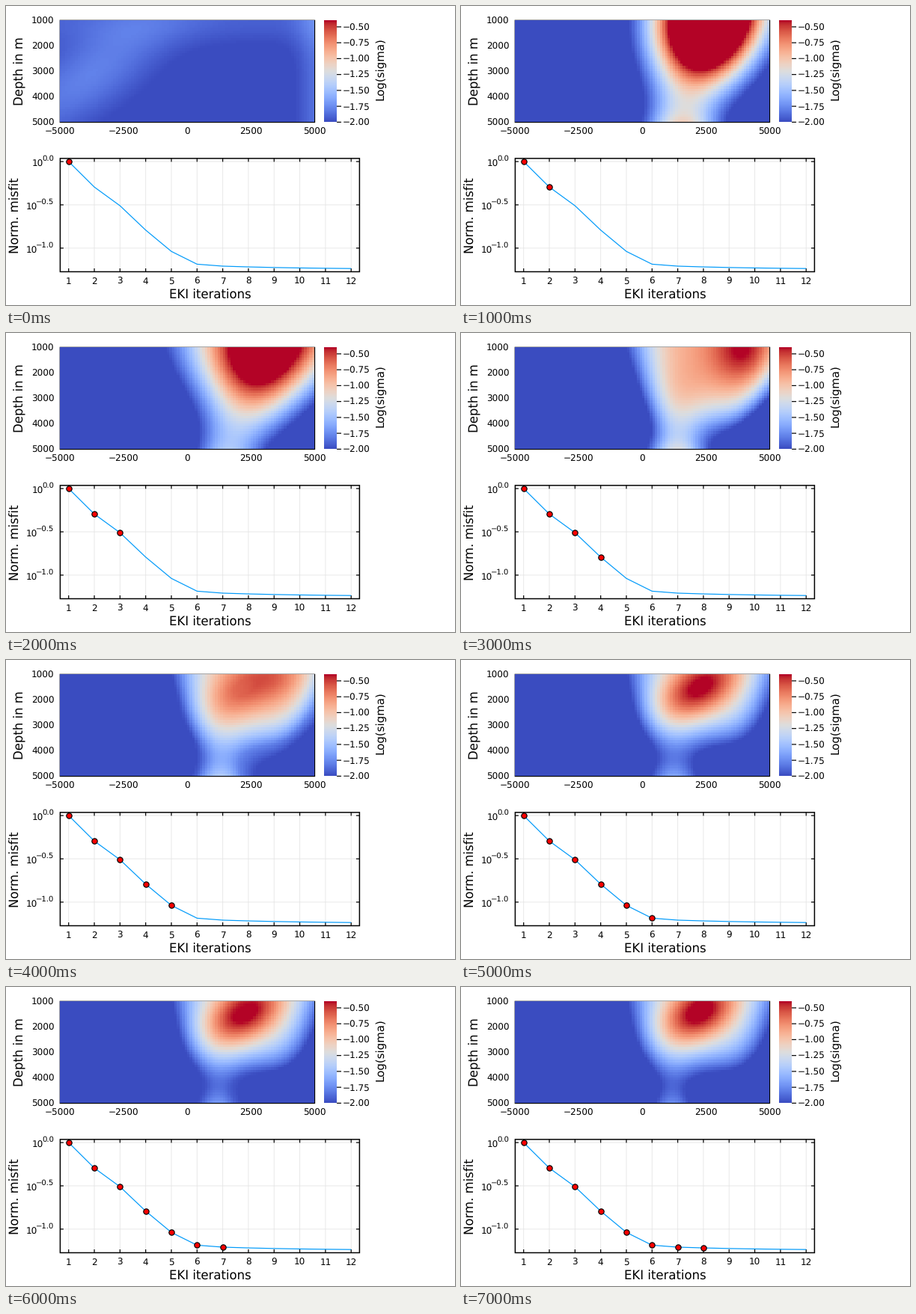
A matplotlib script for the animation above (8 s loop, 600x400 px).

```python
import numpy as np
import matplotlib.pyplot as plt
from matplotlib.animation import FuncAnimation
from matplotlib.patches import Rectangle

PX = 0.72  # points per pixel at 100 dpi
LEFT, RIGHT, TOP, BOTTOM = 72, 412, 19, 155
COLS, ROWS = 100, 40
plt.rcParams["font.family"] = "DejaVu Sans"
plt.rcParams["text.hinting"] = "none"

# Cell centres in stage pixels, and depth from 0 (top) to 1 (bottom)
X, Y = np.meshgrid(
    LEFT + (np.arange(COLS) + 0.5) * (RIGHT - LEFT) / COLS,
    TOP + (np.arange(ROWS) + 0.5) * (BOTTOM - TOP) / ROWS)
DEPTH = (Y - TOP) / (BOTTOM - TOP)


def bump(x, y, rx, ry, tilt=0):
    """Gaussian hill; positive tilt lifts its right end."""
    c, s = np.cos(np.radians(tilt)), np.sin(np.radians(tilt))
    along = (X - x) * c - (Y - y) * s
    across = (X - x) * s + (Y - y) * c
    return np.exp(-(along / rx) ** 2 - (across / ry) ** 2)


def initial_model():
    band = 0.16 * bump(110, 95, 130, 50, 35)
    surface = 0.08 * np.exp(-((Y - TOP) / 35) ** 2)
    side = 0.13 * np.exp(-((X - 420) / 30) ** 2)
    return np.clip(band + surface + side - 0.035, 0, 1)


def model(height, x, width, depth, taper, drift, stem, power=2, hot=0):
    """Body narrowing with depth, on a stem, with an optional hot spot."""
    dx = np.abs(X - x + drift * DEPTH) / (width * (1 - taper * DEPTH))
    body = height * np.exp(-dx ** power - ((Y - TOP) / depth) ** power)
    level, sx, sw = stem
    foot = level * DEPTH ** 3 * np.exp(-((X - sx) / sw) ** 2)
    return np.clip(body + foot + hot - 0.25, 0, 1)


second = model(2.2, 332, 73, 86, 0.15, 20, (0.68, 294, 48))
third = model(1.6, 346, 98, 100, 0.5, 25, (0.42, 290, 42))
fourth = model(0.95, 340, 111, 105, 0.57, 26, (0.7, 288, 40), 4,
               0.33 * bump(378, 22, 45, 45))
sixth = model(0.7, 323, 100, 94, 0.4, 5, (0.47, 284, 38), 4,
              0.59 * bump(320, 36, 62, 37, 32))
eighth = model(0.68, 323, 100, 94, 0.4, 5, (0.4, 282, 32), 4,
               0.64 * bump(319, 33, 56, 37, 32))
fields = [initial_model(), second, third, fourth, (fourth + sixth) / 2,
          sixth, (sixth + eighth) / 2, eighth]

fig = plt.figure(figsize=(6, 4), dpi=100, facecolor="white")
ax = fig.add_axes([0, 0, 1, 1])
ax.axis("off")


def label(x, y, s, size=12, ha="center", rot=0):
    ax.text(x, y, s, size=size * PX, ha=ha, va="baseline",
            rotation=rot, rotation_mode="anchor")


def line(x, y, color="black", width=1.2, z=2):
    ax.plot(x, y, color=color, lw=width * PX, zorder=z,
            solid_capstyle="butt", snap=False)


def box(x0, y0, x1, y1, z):
    ax.add_patch(Rectangle((x0, y0), x1 - x0, y1 - y0, fill=False,
                           ec="black", lw=1.5 * PX, zorder=z, snap=False))


def picture(values, x0, x1):
    return ax.imshow(values, cmap="coolwarm", vmin=0, vmax=1, aspect="auto",
                     extent=(x0, x1, BOTTOM, TOP), interpolation="nearest",
                     zorder=2)


# Section with its axes
box(LEFT + 0.4, TOP + 0.4, RIGHT + 0.4, BOTTOM + 0.4, 1)
heat = picture(fields[0], LEFT, RIGHT)
for i in range(5):
    label(64.5, TOP + 34 * i + 4.9, str(1000 * (i + 1)), ha="right")
    label(LEFT + 85 * i + 0.4, 171.5,
          str(-5000 + 2500 * i).replace("-", "−"))
label(23, 87.5, "Depth in m", 16.5, rot=90)

# Colour scale
picture(np.linspace(1, 0, 256)[:, None], 425, 442)
for i in range(7):
    y = BOTTOM + 0.4 - 21.25 * i
    line([442, 448], [y, y])
    label(450, y + 4.5, f"−{2 - 0.25 * i:.2f}", ha="left")
label(504, 84.5, "Log(sigma)", 15, rot=90)

# Misfit curve: steady descent, then a slow approach to the noise level
X0, X1, Y0, Y1 = 72.4, 472.4, 203.9, 355.5
steps = 83.7 + 34.32 * np.arange(12)
descent = [208.1, 242.2, 267.2, 299.8, 328.3, 345.4]
misfit = np.append(descent, 352.2 - 4.2 * 0.75 ** np.arange(6))
points = np.column_stack([steps, misfit])

for i, x in enumerate(steps):
    line([x, x], [Y0, Y1], "0.9", 0.9, 1)
    line([x, x], [Y0, Y0 + 4.5])
    line([x, x], [Y1 - 4.5, Y1])
    label(x, 371.5, str(i + 1))
for i, power in enumerate(["0.0", "−0.5", "−1.0"]):
    y = 208.1 + 57.9 * i
    line([X0, X1], [y, y], "0.9", 0.9, 1)
    line([X0, X0 + 4.5], [y, y])
    line([X1 - 4.5, X1], [y, y])
    label(50.3 if i == 0 else 41.6, y + 7, "10", ha="right")
    label(64.5, y - 1.5, power, 10, ha="right")
box(X0, Y0, X1, Y1, 3)
line(steps, misfit, "#009afa", 1.2, 4)
label(272.4, 392, "EKI iterations", 16.5)
label(18, 280.5, "Norm. misfit", 16.5, rot=90)
dots = ax.scatter([], [], s=(7.3 * PX) ** 2, c="red", edgecolors="black",
                  linewidths=1.2 * PX, zorder=5)

ax.set_xlim(0, 600)
ax.set_ylim(400, 0)


def update(i):
    heat.set_data(fields[i])
    dots.set_offsets(points[:i + 1])
    return heat, dots


anim = FuncAnimation(fig, update, frames=8, interval=1000, repeat=True)
plt.show()
```
